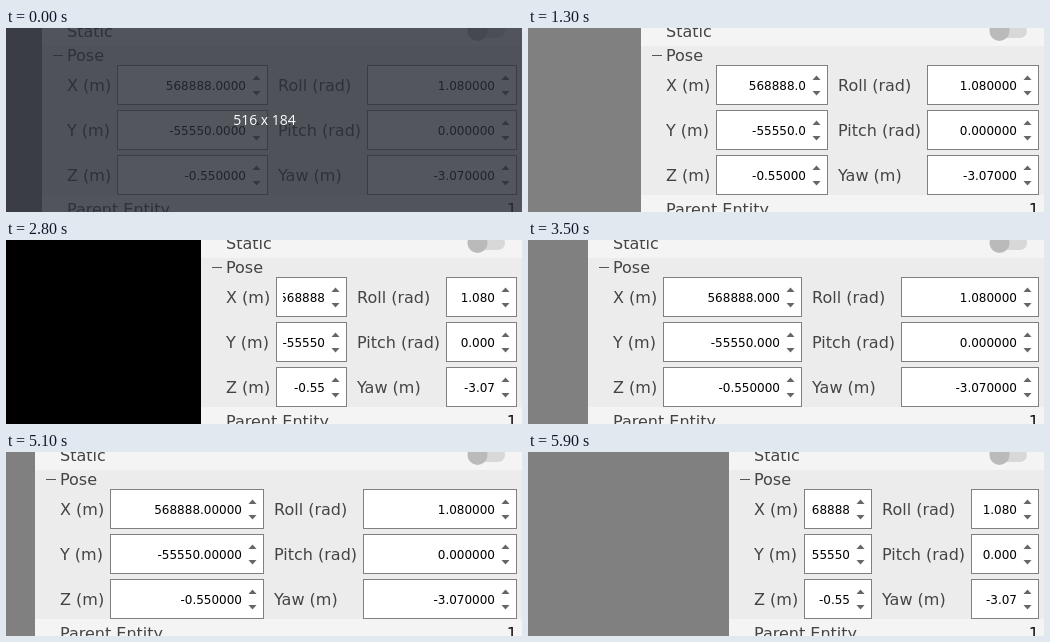
Animation of 516 by 184 pixels, one loop 7200 ms. Source, as an HTML page with a canvas:

```html
<!DOCTYPE html>
<html>
<head>
<meta charset="utf-8">
<style>
  html, body { margin: 0; height: 100%; overflow: hidden; background: #808080; }
  canvas { display: block; }
</style>
</head>
<body>
<canvas id="stage" width="516" height="184"></canvas>
<script>
const ctx = document.getElementById('stage').getContext('2d');
const LOOP = 7200, STEP = 100, RIGHT = 511;

// Panel's left edge while its splitter is dragged: [ms, x]
const drag = [
  [0, 36], [900, 36], [1000, 46], [1300, 113], [1700, 174], [1900, 201],
  [2700, 201], [2800, 195], [3500, 60], [4200, -48],
  [4500, -48], [4600, -42], [5100, 29], [5300, 52], [5800, 195], [5900, 201], [LOOP, 201]
];

const rows = [
  ['X (m)', 568888, 'Roll (rad)', 1.08],
  ['Y (m)', -55550, 'Pitch (rad)', 0],
  ['Z (m)', -0.55, 'Yaw (m)', -3.07]
];

function panelLeft(t) {
  const i = drag.findIndex(([time]) => time > t);
  const [t0, x0] = drag[i - 1], [t1, x1] = drag[i];
  return Math.round(x0 + (x1 - x0) * (t - t0) / (t1 - t0));
}

function rect(x, y, w, h, color) {
  ctx.fillStyle = color;
  ctx.fillRect(x, y, w, h);
}

function text(str, x, y, color = '#444', font = '16px "DejaVu Sans", sans-serif', align = 'left') {
  ctx.fillStyle = color;
  ctx.font = font;
  ctx.textAlign = align;
  ctx.fillText(str, x, y);
}

// Wider boxes show more decimals, up to six
function format(value, width) {
  const chars = Math.floor((width - 8) / 12);
  const whole = String(Math.trunc(value)).length + (value < 0 && value > -1 ? 1 : 0);
  return value.toFixed(Math.max(0, Math.min(6, chars - whole - 1)));
}

function arrow(x, base, tip) {
  ctx.fillStyle = '#666';
  ctx.beginPath();
  ctx.moveTo(x - 4, base);
  ctx.lineTo(x + 4, base);
  ctx.lineTo(x, tip);
  ctx.fill();
}

function spinBox(left, right, y, value, width) {
  rect(left, y, right - left, 40, '#808080');
  rect(left + 1, y + 1, right - left - 2, 38, '#fff');
  arrow(right - 11.5, y + 15, y + 10.5);
  arrow(right - 11.5, y + 26, y + 30.5);
  ctx.save();
  ctx.beginPath();
  ctx.rect(left + 7, y, right - left - 28, 40);
  ctx.clip();
  text(format(value, width), right - 22, y + 25, '#000', '12px "DejaVu Sans", sans-serif', 'right');
  ctx.restore();
}

function toggle() {
  ctx.fillStyle = '#d8d8d8';
  ctx.beginPath();
  ctx.roundRect(463, -4, 36, 14, 7);
  ctx.fill();
  ctx.fillStyle = '#bababa';
  ctx.beginPath();
  ctx.arc(471.5, 3, 10, 0, Math.PI * 2);
  ctx.fill();
}

function draw(t) {
  const left = panelLeft(t);
  const width = (337 - left) / 2;
  const firstRight = Math.round(left + 75 + width);
  const secondLeft = Math.round(RIGHT - width);

  // The 3D view blanks for a moment when the second drag starts
  rect(0, 0, 516, 184, t === 2800 ? '#000' : '#808080');
  rect(left, 0, 516 - left, 184, '#f4f4f4');
  rect(left, 18, 516 - left, 149, '#ececec');

  toggle();
  text('Static', left + 25, 9);
  rect(left + 11, 27, 10, 1, '#555');
  text('Pose', left + 25, 33);
  rows.forEach(([label1, value1, label2, value2], i) => {
    const y = 37 + 45 * i;
    text(label1, left + 25, y + 26);
    spinBox(left + 75, firstRight, y, value1, width);
    text(label2, firstRight + 10, y + 26);
    spinBox(secondLeft, RIGHT, y, value2, width);
  });
  text('Parent Entity', left + 25, 187);
  text('1', RIGHT, 187, '#111', undefined, 'right');

  if (t < 100) {
    rect(0, 0, 516, 184, 'rgba(40, 44, 52, .8)');
    text('516 x 184', 258.5, 97, '#fff', '14px "Open Sans", sans-serif', 'center');
  }
}

function tick() {
  draw(Math.floor(performance.now() % LOOP / STEP) * STEP);
  requestAnimationFrame(tick);
}
tick();
</script>
</body>
</html>
```
